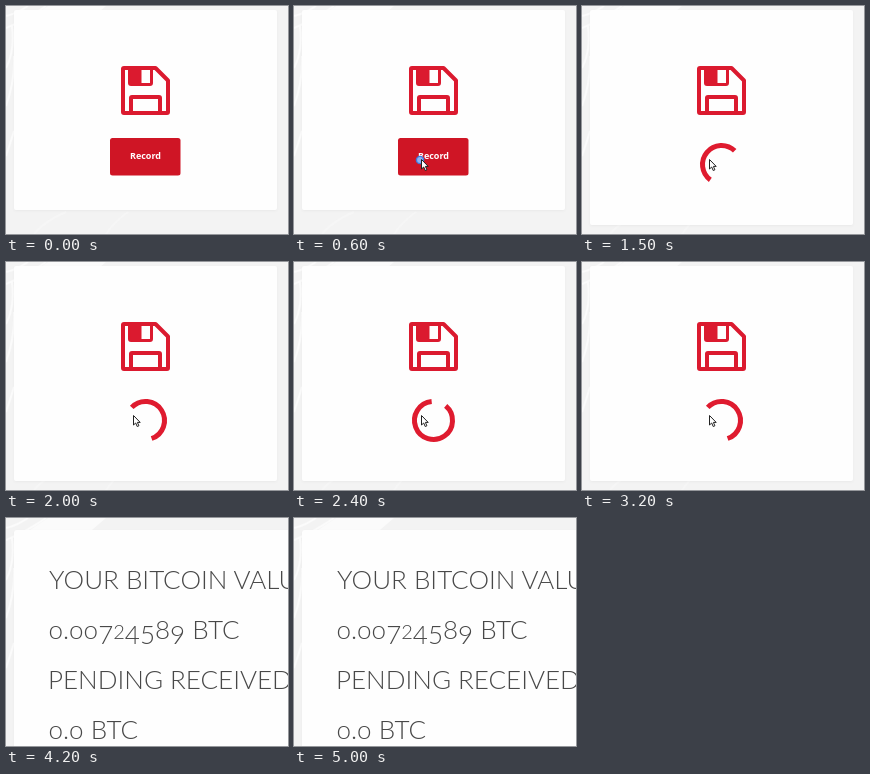
These frames come from a looping animation (282 px wide and 228 px high, 5.2 s). An HTML page:

```html
<!DOCTYPE html>
<html lang="en">
<head>
<meta charset="utf-8">
<title>Record and value</title>
<style>
  html, body { margin: 0; width: 100%; height: 100%; overflow: hidden; background: #f3f3f3; }
  svg { display: block; width: 282px; height: 228px; }
  .card { fill: #fefefe; filter: drop-shadow(0 1px 1px rgba(0, 0, 0, .04)); }
  .swirls { fill: none; stroke: #fbfbfb; stroke-width: 2; }
  .icon { fill: none; stroke: #db1a2f; stroke-width: 4; stroke-linejoin: round; }
  .label { font: 700 9px "Open Sans", sans-serif; fill: #fff; text-anchor: middle; }
  .values { font: 300 26px Lato, sans-serif; fill: #484848; }
  .small { font-size: 20px; }
  #spinner { fill: none; stroke: #df1b2f; stroke-width: 5; }
  [hidden] { display: none; }
</style>
</head>
<body>
<svg viewBox="0 0 282 228">
  <rect width="282" height="228" fill="#f3f3f3"/>
  <g class="swirls">
    <path d="M24 12L42 0H100L86 12Z" fill="#fbfbfb" stroke="none"/>
    <path d="M22 0Q10 8 0 10M40 0Q20 14 0 22M0 62Q9 45 6 20M0 100Q9 75 8 50M0 150Q5 135 8 125"/>
    <path d="M28 228Q40 214 60 206M100 228Q108 216 122 206" opacity=".4"/>
  </g>

  <g id="form">
    <rect id="panel" class="card" x="8" y="4" width="263" height="200" rx="2"/>
    <g class="icon">
      <path d="M118 62H149.5L162 74.5V106Q162 107 161 107H118Q117 107 117 106V63Q117 62 118 62Z"/>
      <path d="M125 107V92Q125 91 126 91H153Q154 91 154 92V107"/>
      <path d="M123.5 62V77Q123.5 78.5 125 78.5H144Q145.5 78.5 145.5 77V62" stroke-width="3"/>
      <path d="M124 63H135V78H124Z" fill="#db1a2f" stroke-width="1"/>
    </g>
    <g id="button">
      <rect x="104" y="132" width="70.5" height="37.5" rx="2.5" fill="#cf1525"/>
      <text class="label" x="139.5" y="153">Record</text>
    </g>
    <path id="spinner"/>
  </g>

  <g id="result">
    <rect class="card" x="8" y="12" width="300" height="240" rx="3"/>
    <g class="values">
      <text x="43" y="71.2">YOUR BITCOIN VALUE</text>
      <text x="42.5" y="121.2" data-figures="0.00724589 BTC"></text>
      <text x="42" y="171.2">PENDING RECEIVED</text>
      <text x="42.5" y="221.2" data-figures="0.0 BTC"></text>
    </g>
  </g>

  <g id="cursor">
    <circle id="press" cx="-1" cy="1" r="3.6" fill="#8fb4f2" stroke="#3f78dc" stroke-width="1.4"/>
    <path d="M.5 .5V10L2.7 8L4.2 11.5L5.9 10.8L4.4 7.4H7.2Z" fill="#fff" stroke="#222" stroke-width="1"/>
  </g>
</svg>
<script>
  const LOOP = 5200, STEP = 100, TURN = 1200;
  const SPIN_AT = 700, RESULT_AT = 3400;
  const $ = id => document.getElementById(id);
  const show = (id, on) => $(id).toggleAttribute('hidden', !on);
  const wave = (t, peak) => Math.cos((t - peak) / TURN * 2 * Math.PI);

  // Old-style figures: round zeros, a small 2, lowered 4 5 7 9.
  function setFigures(el) {
    let shift = 0;
    for (const ch of el.dataset.figures) {
      const span = document.createElementNS(el.namespaceURI, 'tspan');
      const drop = '4579'.includes(ch) ? 5 : 0;
      span.textContent = ch === '0' ? 'o' : ch;
      if (ch === '2') span.setAttribute('class', 'small');
      if (drop !== shift) span.setAttribute('dy', drop - shift);
      shift = drop;
      el.append(span);
    }
    el.setAttribute('aria-label', el.dataset.figures);
  }
  document.querySelectorAll('[data-figures]').forEach(setFigures);

  // The arc turns once per TURN while its length swells and shrinks.
  function arc(t) {
    const r = 19, cx = 139.5, cy = 158.5;
    const p = t - 800;
    const mid = 55.5 + p / TURN * 360 + 21.7 + 22.8 * wave(p, 700);
    const len = 223 + 98 * wave(p, 330);
    const point = deg => {
      const a = deg * Math.PI / 180;
      return `${cx + r * Math.sin(a)} ${cy - r * Math.cos(a)}`;
    };
    return `M${point(mid - len / 2)}A${r} ${r} 0 ${len > 180 ? 1 : 0} 1 ${point(mid + len / 2)}`;
  }

  // Pointer stops: time, x, y
  const stops = [[300, 228, 90], [400, 190, 113], [500, 150, 140], [600, 127, 153],
    [3800, 127, 153], [3900, 136, 160], [4000, 164, 180], [4100, 204, 208], [4200, 230, 232]];

  function pointer(t) {
    const i = stops.findIndex(s => s[0] > t);
    if (i < 1) return null;
    const [a, b] = [stops[i - 1], stops[i]];
    const k = (t - a[0]) / (b[0] - a[0]);
    return [a[1] + (b[1] - a[1]) * k, a[2] + (b[2] - a[2]) * k];
  }

  function draw(t) {
    const spinning = t >= SPIN_AT;
    show('form', t < RESULT_AT);
    show('result', t >= RESULT_AT);
    show('button', !spinning);
    show('spinner', spinning);
    $('panel').setAttribute('height', spinning ? 215 : 200);
    $('spinner').setAttribute('d', arc(t));

    const at = pointer(t);
    show('cursor', at);
    show('press', t >= 600 && t < 900);
    if (at) $('cursor').setAttribute('transform', `translate(${at})`);
  }

  const start = performance.now();
  function tick() {
    const t = (performance.now() - start) % LOOP;
    draw(Math.floor(t / STEP) * STEP);
    requestAnimationFrame(tick);
  }
  tick();
</script>
</body>
</html>
```
